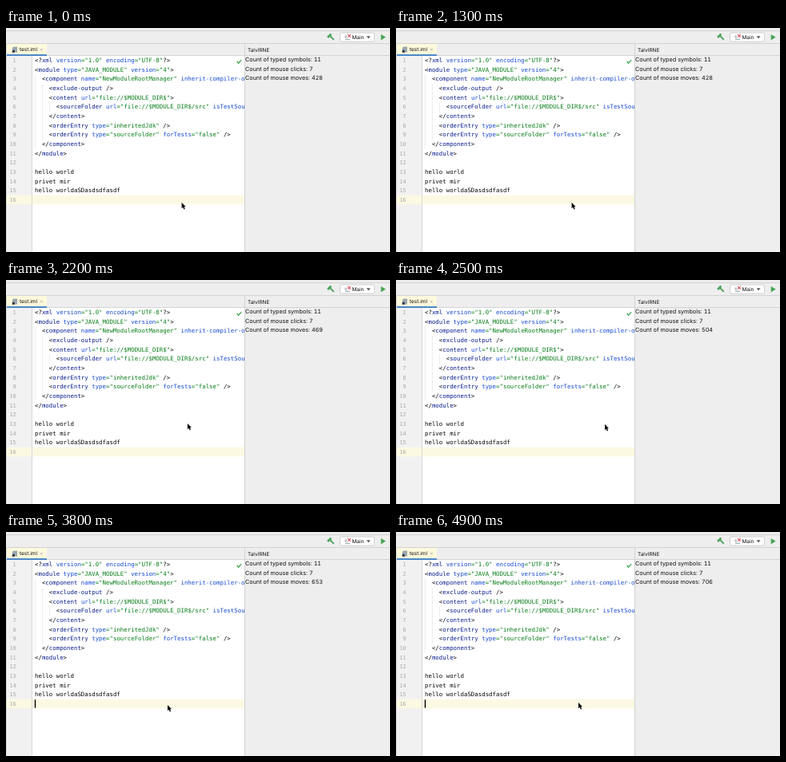
An HTML page that plays this animation: 480 px wide and 281 px high, repeating every 5000 ms.

```html
<!DOCTYPE html>
<html lang="en">
<head>
<meta charset="utf-8">
<title>Editor statistics</title>
<style>
  html, body { margin: 0; width: 100%; height: 100%; overflow: hidden; background: #eeeeee; }
  svg { display: block; width: 480px; height: 281px; }
  text { font: 6.5px Inter, "Liberation Sans", sans-serif; fill: #111; text-rendering: geometricPrecision; }
  .code text { font: 7.4px "DejaVu Sans Mono", monospace; fill: #080808; }
  .code .num { fill: #a9a9a9; font-size: 6.8px; text-anchor: end; }
  .code .tag { fill: #0a1f8f; }
  .code .attr { fill: #174ad4; }
  .code .val { fill: #067d17; }
  .stats text { font-size: 7.25px; font-variant-numeric: tabular-nums; }
</style>
</head>
<body>
<svg viewBox="0 0 480 281">
  <defs><clipPath id="pane"><path d="M0 35H298V281H0z"/></clipPath></defs>

  <!-- toolbar -->
  <rect width="480" height="281" fill="#eeeeee"/>
  <path d="M0 3.5H480M0 19.5H480" stroke="#d2d2d2"/>
  <g transform="translate(406.3 11.3) rotate(-45)" fill="#4fa45f">
    <rect x="-3.4" y="-4" width="6.2" height="2.8" rx=".6"/>
    <rect x="-.9" y="-2" width="1.9" height="7" rx=".6"/>
  </g>
  <rect x="417.5" y="6" width="43" height="11" rx="2" fill="#fff" stroke="#c4c4c4" stroke-width=".8"/>
  <path d="M424 14.2h6" stroke="#9aa7b0" stroke-width="1.2"/>
  <path d="M427.2 8l3.6 3.6m0-3.6l-3.6 3.6" stroke="#db5860" stroke-width="1.1"/>
  <path d="M423.5 9.5h2.5v3h-2.5z" fill="#b5bec6"/>
  <text x="432.5" y="14">Main</text>
  <path d="M450.6 10.2h5l-2.5 3z" fill="#555"/>
  <path d="M468.7 8l6 3.6-6 3.6z" fill="#45a556"/>

  <!-- tab -->
  <rect x="1" y="20" width="50" height="14" fill="#fcf9dc"/>
  <path d="M0 34.5H480" stroke="#d4d4d4"/>
  <rect x="1" y="33" width="50" height="2" fill="#4a88c9"/>
  <path d="M9.5 23.5h4.5v7h-6v-5.5z" fill="#9aa7b0"/>
  <rect x="7.8" y="27.8" width="3" height="3" fill="#30363b"/>
  <text x="17" y="29.4">test.iml</text>
  <path d="M42.8 25.6l3 3m0-3l-3 3" stroke="#a8a8a8" stroke-width=".7"/>
  <text x="302" y="29.6">TalvIRNE</text>

  <!-- editor -->
  <rect y="35" width="298" height="246" fill="#fff"/>
  <rect y="35" width="32" height="246" fill="#f1f1f1"/>
  <rect y="209.7" width="298" height="11.6" fill="#fcf9e2"/>
  <path d="M32.5 35V281" stroke="#d8d8d8"/>
  <path d="M298.5 20V281" stroke="#d2d2d2"/>
  <path d="M.5 20V281" stroke="#dadada"/>
  <path d="M36.5 58V151M45.5 70V140M54.5 93V105" stroke="#e6e6e6" stroke-width=".7"/>
  <g class="code" clip-path="url(#pane)"></g>
  <path d="M288.6 42l2 2.1 3.5-4" fill="none" stroke="#45a556" stroke-width="1.4"/>
  <rect id="caret" x="35.8" y="210.3" width="1.4" height="10.3" fill="#000"/>

  <!-- statistics -->
  <g class="stats">
    <text x="299" y="42.1">Count of typed symbols: 11</text>
    <text x="299" y="53.7">Count of mouse clicks: 7</text>
    <text x="299" y="65.3" id="moves"></text>
  </g>

  <path id="mouse" d="M0 0V7.2L1.6 5.8 2.8 8.5 4.1 7.9 3 5.3H5.1z"
        fill="#000" stroke="#fff" stroke-width=".7" paint-order="stroke"/>
</svg>
<script>
const LOOP = 5000, STEP = 100;
const LINES = `<?xml version="1.0" encoding="UTF-8"?>
<module type="JAVA_MODULE" version="4">
  <component name="NewModuleRootManager" inherit-compiler-output="true">
    <exclude-output />
    <content url="file://$MODULE_DIR$">
      <sourceFolder url="file://$MODULE_DIR$/src" isTestSource="false" />
    </content>
    <orderEntry type="inheritedJdk" />
    <orderEntry type="sourceFolder" forTests="false" />
  </component>
</module>

hello world
privet mir
hello worldaSDasdsdfasdf
`.split("\n");

// time, x, y of the pointer tip
const PATH = [
  [1850, 219.6, 219], [2100, 219, 190], [2300, 238, 174], [2500, 261, 181],
  [2750, 266, 206], [3000, 251, 229], [3100, 240, 242.5], [3300, 222, 260],
  [3600, 203, 247], [3800, 202, 217], [4000, 211, 200], [4150, 222, 204], [4250, 228, 214]
];
// time, number of mouse moves
const COUNTS = [[1850, 428], [2500, 504], [3100, 568], [3800, 653], [4250, 706]];

const $ = s => document.querySelector(s);
const code = $(".code"), caret = $("#caret"), moves = $("#moves"), mouse = $("#mouse");

function add(parent, name, attrs, str = "") {
  const el = document.createElementNS("http://www.w3.org/2000/svg", name);
  for (const k in attrs) el.setAttribute(k, attrs[k]);
  el.textContent = str;
  return parent.appendChild(el);
}

function tokenClass(part, next = "") {
  if (part.startsWith("=")) return "val";
  if (!/^\w/.test(part)) return "";
  return next.startsWith("=") ? "attr" : "tag";
}

LINES.forEach((line, i) => {
  const y = 43 + i * 11.66, body = line.trimStart();
  add(code, "text", { class: "num", x: 12.6, y }, i + 1);
  const row = add(code, "text", { x: 36 + (line.length - body.length) * 4.455, y });
  if (!body.startsWith("<")) { row.textContent = body; return; }
  const parts = body.split(/(="[^"]*"|[\w-]+)/).filter(Boolean);
  parts.forEach((p, k) => add(row, "tspan", { class: tokenClass(p, parts[k + 1]) }, p));
});

// Index of the active segment and the progress within it
function locate(keys, t) {
  let i = 0;
  while (i < keys.length - 2 && t >= keys[i + 1][0]) i++;
  const u = (t - keys[i][0]) / (keys[i + 1][0] - keys[i][0]);
  return [i, Math.min(1, Math.max(0, u))];
}

function spline(t, axis) {
  const [i, u] = locate(PATH, t);
  const at = k => PATH[Math.min(PATH.length - 1, Math.max(0, k))];
  const [p, a, b, n] = [at(i - 1), at(i), at(i + 1), at(i + 2)];
  const d = b[0] - a[0];
  const m0 = (b[axis] - p[axis]) / (b[0] - p[0]) * d;
  const m1 = (n[axis] - a[axis]) / (n[0] - a[0]) * d;
  const u2 = u * u, u3 = u2 * u;
  return (2 * u3 - 3 * u2 + 1) * a[axis] + (u3 - 2 * u2 + u) * m0
       + (3 * u2 - 2 * u3) * b[axis] + (u3 - u2) * m1;
}

function countAt(t) {
  const [i, u] = locate(COUNTS, t), a = COUNTS[i][1];
  return Math.round(a + (COUNTS[i + 1][1] - a) * u);
}

function draw(t) {
  const blink = t >= 520 && (t - 520) % 1010 < 500;
  caret.setAttribute("visibility", blink ? "visible" : "hidden");
  mouse.setAttribute("transform", `translate(${spline(t, 1)} ${spline(t, 2)})`);
  moves.textContent = "Count of mouse moves: " + countAt(t);
}

const start = performance.now();
function tick() {
  const t = (performance.now() - start) % LOOP;
  draw(Math.floor(t / STEP + 0.005) * STEP);
  requestAnimationFrame(tick);
}
tick();
</script>
</body>
</html>
```
